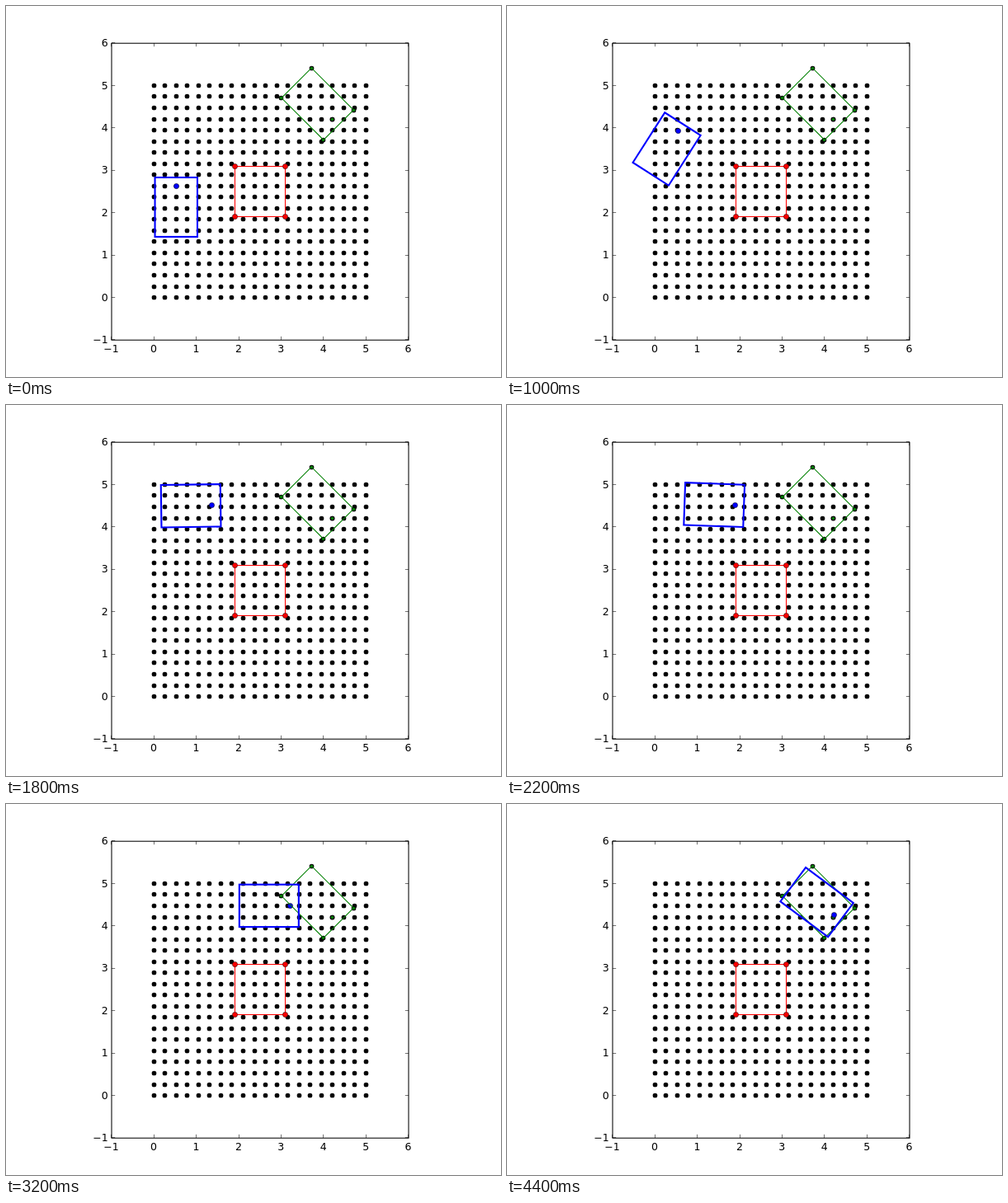
Animation of 600 by 450 pixels, one loop 4.45 s. Source, as an HTML page:

```html
<!DOCTYPE html>
<html lang="en">
<head>
<meta charset="utf-8">
<title>Parking path</title>
<style>
  html, body { margin: 0; width: 100%; height: 100%; overflow: hidden; background: #fff; }
  svg { display: block; width: 600px; height: 450px; }
  text { font: 12.5px "DejaVu Sans", sans-serif; }
</style>
</head>
<body>
<svg id="stage" viewBox="0 0 600 450"></svg>
<script>
const UNIT = 360 / 7;
const STEP_MS = 200;
const LOOP_MS = 4450;
const STEP = UNIT * 5 / 19;
const BODY = { x: -1.2 * UNIT, y: -0.5 * UNIT, width: 1.4 * UNIT, height: UNIT };

// Heading of the car at each step, in degrees; it backs up once.
const HEADINGS = [90, 105, 91, 87, 72, 57.5, 43, 27.4, 12.4, 0.8, -1, -2, -1.6,
  -1.2, -0.8, -0.4, 0, -2.2, -11, -16.8, -23, -29, -36.7];
const REVERSE_STEP = 19;

const stage = document.getElementById("stage");
const px = x => 179.2 + x * UNIT;
const py = y => 353.57 - y * UNIT;
const crisp = v => Math.floor(v) + 0.5;

function add(tag, attrs, parent = stage) {
  const el = document.createElementNS("http://www.w3.org/2000/svg", tag);
  for (const name in attrs) el.setAttribute(name, attrs[name]);
  return parent.appendChild(el);
}

function dot(x, y, r, fill, edge) {
  return add("circle", { cx: x, cy: y, r, fill, stroke: "#000", "stroke-width": edge });
}

function label(text, x, y, anchor) {
  add("text", { x, y, "text-anchor": anchor }).textContent = text;
}

function outline(points, color) {
  add("polygon", { points: points.join(" "), fill: "none", stroke: color, "stroke-width": 1.04 });
}

function drawGrid() {
  for (let i = 0; i < 20; i++) {
    for (let j = 0; j < 20; j++) {
      dot(crisp(px(i * 5 / 19)), crisp(py(j * 5 / 19)), 2.33, "#000", 1.04);
    }
  }
}

function drawAxes() {
  for (let n = -1; n <= 6; n++) {
    const x = crisp(px(n)), y = crisp(py(n));
    const text = String(n).replace("-", "\u2212");
    add("path", {
      d: `M${x} 405v-4.2M${x} 45v4.2M128 ${y}h4.2M488 ${y}h-4.2`,
      stroke: "#000", "stroke-width": 0.55
    });
    label(text, px(n) - 0.2, 420, "middle");
    label(text, 123.6, py(n) + 4.2, "end");
  }
  add("rect", { x: 128, y: 45.2, width: 360, height: 360, fill: "none", stroke: "#000", "stroke-width": 1.04 });
}

// Each pose moves along the heading of the pose before it.
function makePoses() {
  let x = px(10 / 19), y = py(50 / 19);
  return HEADINGS.map((heading, i) => {
    const pose = { x, y, heading };
    const move = i === REVERSE_STEP ? -STEP : STEP;
    const angle = heading * Math.PI / 180;
    x += move * Math.cos(angle);
    y -= move * Math.sin(angle);
    return pose;
  });
}

function goalCorners() {
  const c = Math.SQRT1_2, at = 80 / 19;
  return [[0.2, 0.5], [0.2, -0.5], [-1.2, -0.5], [-1.2, 0.5]].map(
    ([along, side]) => [px(at + c * (along + side)), py(at + c * (side - along))]);
}

const poses = makePoses();
const goal = goalCorners();
const block = [[1.9, 1.9], [3.1, 1.9], [3.1, 3.1], [1.9, 3.1]]
  .map(([x, y]) => [crisp(px(x) + 0.3), crisp(py(y))]);

drawGrid();
for (const [x, y] of [...goal, [px(80 / 19), py(80 / 19)]]) {
  dot(crisp(x), crisp(y), 2.33, "#008000", 1.04);
}
const axle = dot(0, 0, 3.1, "#00f", 0.52);
outline(block, "#f00");
for (const [x, y] of block) dot(x, y, 3.1, "#f00", 0.52);
outline(goal, "#008000");
const car = add("rect", { ...BODY, fill: "none", stroke: "#00f", "stroke-width": 2.08 });
drawAxes();

function show(step) {
  const { x, y, heading } = poses[step];
  axle.setAttribute("cx", crisp(x));
  axle.setAttribute("cy", crisp(y));
  car.setAttribute("transform", `translate(${x} ${y}) rotate(${-heading})`);
}

const start = performance.now();
function tick() {
  const time = (performance.now() - start) % LOOP_MS;
  show(Math.min(poses.length - 1, Math.floor(time / STEP_MS)));
  requestAnimationFrame(tick);
}
tick();
</script>
</body>
</html>
```
